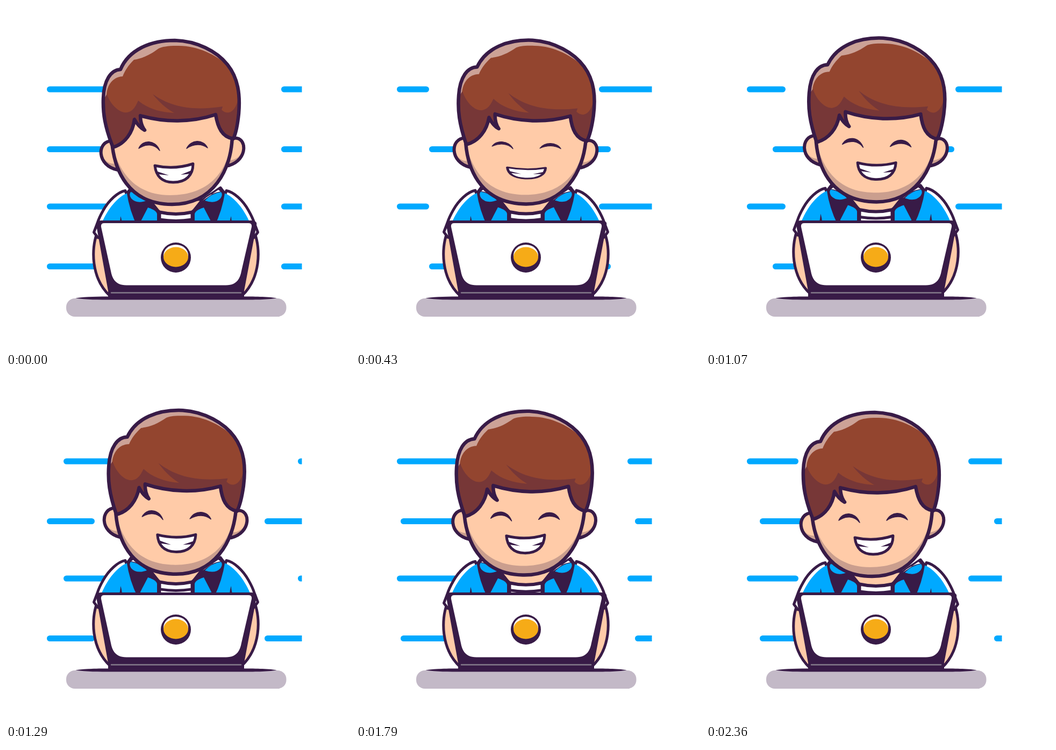
An HTML page that plays this animation: 640 by 640 pixels, repeating every 2430 ms.

```html
<!DOCTYPE html>
<html lang="en">
<head>
<meta charset="utf-8">
<title>Boy at laptop</title>
<style>
  html, body { margin: 0; height: 100%; overflow: hidden; background: #fff; }
  svg { display: block; }
  #stage { width: 100vw; height: 100vh; }
  .ink { fill: #381b47; }
  .skin { fill: #ffcba8; }
  .shade { fill: #ca9e8e; }
  .blue { fill: #00a9ff; }
  .white { fill: #fff; }
  .line { stroke: #381b47; stroke-width: 5; stroke-linejoin: round; stroke-linecap: round; }
  .none { fill: none; }
  #rows path { stroke: #00a9ff; stroke-width: 11; stroke-linecap: round; stroke-dasharray: 109 109; fill: none; }
</style>
</head>
<body>
<svg id="stage" viewBox="0 0 640 640">
  <svg id="rows" width="550.5" height="640">
    <path d="M81.5 155H620"/>
    <path d="M81.5 266.500H620"/>
    <path d="M81.5 373H620"/>
    <path d="M81.5 484.500H620"/>
  </svg>

  <rect x="112" y="544" width="409.5" height="34" rx="16" fill="#c3b9c7"/>

  <g id="torso">
    <path class="skin line" d="M268 360Q276 378 286 383Q316 390 346 383Q358 376 365 360Z"/>
    <path class="white line" d="M286 384Q316 391 346 384V410H286Z"/>
    <path class="none line" d="M286 397Q316 402 346 397" stroke-width="4"/>
    <g id="side">
      <path class="skin line" d="M169 424C159 450 157 506 194 540L200 530L176 424Z"/>
      <path class="white line" d="M222 343.500C208 346 191 362 181 380Q173 394 170 404L163.500 421L171 431H250Z"/>
      <path class="blue" d="M226 348C208 355 190 376 178 404V412H250Z"/>
      <path class="ink" d="M210 410Q213 398 213 391Q216 398 216 410Z"/>
      <path class="ink line" d="M227 346L233 338L268 362L284 382V410H247Q232 380 227 346Z"/>
      <path class="blue" d="M250 402L264 375Q280 380 281 387V410H250Z"/>
      <path class="blue" d="M232 346Q228 351 233 358Q243 369 262 362Q250 349 232 346Z"/>
      <path class="white" d="M233 345L237 342L266 362Q252 348 233 345Z"/>
    </g>
    <use href="#side" transform="matrix(-1 0 0 1 632 0)"/>
  </g>

  <g id="head">
    <path class="skin" d="M196 251C169 252 168 297 208 305Z"/>
    <path class="shade" d="M178 276C184 292 196 295 208 293V305Q183 299 178 276Z"/>
    <path class="none line" style="stroke-width:6" d="M196 251C169 252 168 297 208 305"/>
    <path class="skin" d="M424 246C448 242 452 286 414 297Z"/>
    <path class="shade" d="M441 265C438 280 426 287 415 287L414 297Q441 288 441 265Z"/>
    <path class="none line" style="stroke-width:6" d="M424 246C448 242 452 286 414 297"/>

    <path class="skin" d="M198 200V262C203 300 224 369 309 369C385 369 420 305 421 240V200Z"/>
    <path class="shade" d="M198 262C203 300 224 369 309 369C385 369 420 305 421 240C416 300 385 352 305 352C246 352 214 317 198 262Z"/>
    <path class="none line" style="stroke-width:6.500" d="M198 262C203 300 224 369 309 369C385 369 420 305 421 240"/>

    <path id="hair" fill="#93452f" d="M199 263C184 225 180 200 181 172C182 138 195 119 213 118C228 82 268 64 314 64C355 65 392 84 412 109C432 134 436 165 433 200C431 220 428 236 423 247C402 244 394 226 390 202C345 217 295 217 250 204C250 214 252 223 258 231C250 227 244 220 239 211C236 235 222 256 199 263Z"/>
    <path fill="#773737" d="M185 155C190 180 210 200 225 198C238 196 242 184 246 176C262 190 285 198 313 199C297 190 284 178 273 164C305 187 345 196 403 187Q402 191 401 193C412 204 430 200 434 160L433 200C431 220 428 236 423 247C402 244 394 226 390 202C345 217 295 217 250 204L258 231L239 211C236 235 222 256 199 263C184 225 180 200 181 172Z"/>
    <path fill="#cca297" d="M183 172C182 138 195 119 213 118C228 82 268 64 314 64C355 65 392 84 414 112C390 90 355 73 318 74C300 74 290 76 284 79C268 91 255 97 238 100C228 110 221 120 217 131C198 132 188 148 187 165Z"/>
    <use href="#hair" class="line" style="fill-opacity:0;stroke-width:6.500"/>

    <g id="eyes" class="ink line" style="stroke-width:1.500">
      <path d="M247 265C254 248 278 248 286 269C276 256 260 256 247 265Z"/>
      <path d="M336 265C344 248 367 247 375 264C364 256 350 256 336 265Z"/>
    </g>
    <g id="mouth">
      <path class="white line" d="M277 297Q313 305 348 293.500C348 315 335 328 311 328C290 328 279 316 277 297Z"/>
      <path class="ink" d="M279 307L303 315L282 313ZM347 305L325 314L344 312Z"/>
    </g>
  </g>

  <path class="ink" d="M129 543.500C150 540.500 170 540.500 200 540.500H432C465 540.500 484 540.500 504 543.500C484 546.500 465 546.500 432 546.500H200C170 546.500 150 546.500 129 543.500Z"/>
  <path class="ink" d="M177 399H456Q468 399 466 408L443 530V544H190V530L168 408Q166 399 177 399Z"/>
  <path class="white" d="M183 404H451Q458 404 457 411L438 493C435 511 426 519.500 409 519.500H224C207 519.500 198 511 195 493L177 411Q176 404 183 404Z"/>
  <path d="M196 533.500H437" stroke="#83798a" stroke-width="2.500" stroke-linecap="round"/>
  <circle class="ink" cx="316" cy="468" r="28"/>
  <ellipse class="white" cx="316" cy="464" rx="23" ry="20"/>
  <ellipse cx="316" cy="467" rx="23" ry="18.500" fill="#f6ab17"/>
</svg>

<script>
const LOOP = 2430, FPS = 14;
// Poses over time, counted in steps of 1/14 s
const STEPS = [0, 6, 11, 15, 21, 25, 33, 34];
const SLIDE = [0, 158, 288, 388, 546, 647, 848, 872];
const TILT = [0, 2.4, 2.75, 2.6, 2.3, 1.45, 0, 0];
const BOB = [0, -0.5, -2, -4.5, -3.7, -2.3, 0, 0];
const OPEN = [1, 0.62, 0.63, 0.95, 1, 1, 1, 1];

const $ = id => document.getElementById(id);
const rows = document.querySelectorAll('#rows path');

function at(values, step) {
  let k = 0;
  while (step >= STEPS[k + 1]) k++;
  const u = (step - STEPS[k]) / (STEPS[k + 1] - STEPS[k]);
  return values[k] + (values[k + 1] - values[k]) * u;
}

const move = (id, value) => $(id).setAttribute('transform', value);
const squash = (id, y, s) => move(id, `translate(0 ${y * (1 - s)}) scale(1 ${s})`);

function draw(now) {
  const tick = Math.floor((now % LOOP) / 10) * 10 + 5;
  const step = Math.floor(tick * FPS / 1000);
  const slide = at(SLIDE, step), bob = at(BOB, step), open = at(OPEN, step);

  rows.forEach((row, n) => row.style.strokeDashoffset = (n % 2 ? slide : -slide) % 218);
  move('torso', `translate(0 ${bob})`);
  move('head', `translate(0 ${bob}) rotate(${at(TILT, step)} 315 410)`);
  squash('mouth', 311, open);
  squash('eyes', 262, (1 + 2 * open) / 3);
}

const start = performance.now();
function loop() {
  draw(performance.now() - start);
  requestAnimationFrame(loop);
}
loop();
</script>
</body>
</html>
```
